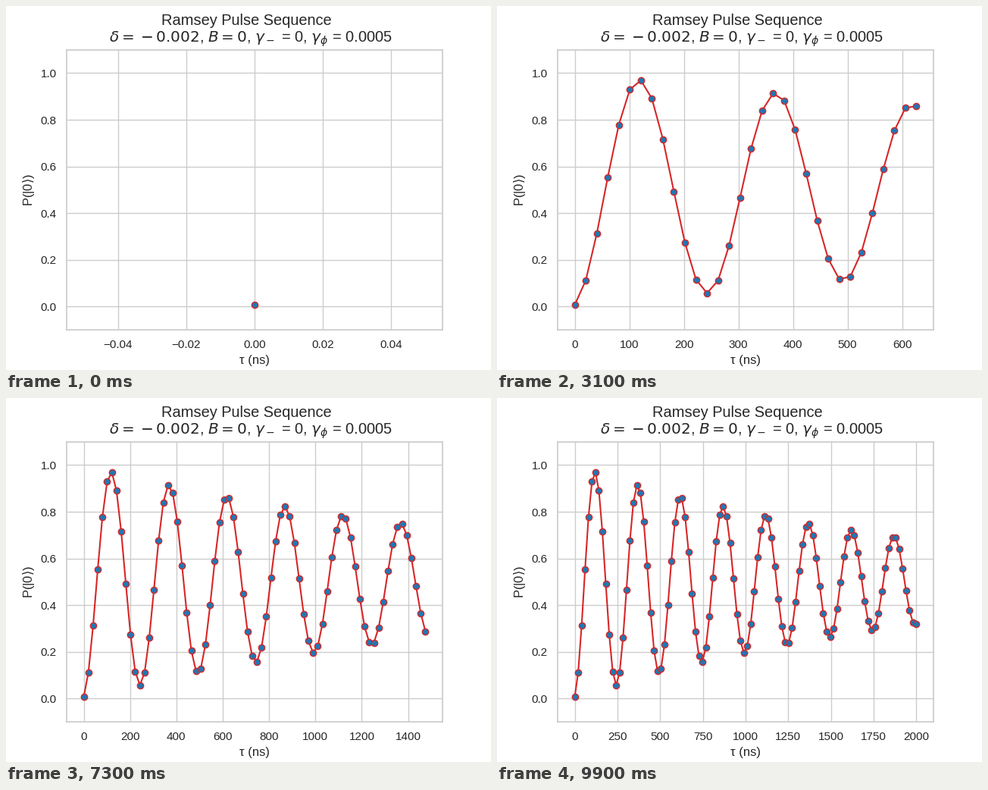
These frames come from a looping animation (640 by 480 pixels, 10 s). A matplotlib script:

```python
import matplotlib.pyplot as plt
import numpy as np
from matplotlib.animation import FuncAnimation

INK = "0.15"
RULE = "0.8"

plt.rcParams.update({
    "font.family": "sans-serif",
    "font.sans-serif": ["Liberation Sans", "DejaVu Sans"],
    "font.size": 12,
    "axes.labelsize": 12,
    "xtick.labelsize": 11,
    "ytick.labelsize": 11,
    "figure.titlesize": 14.4,
    "text.color": INK,
    "axes.labelcolor": INK,
    "xtick.color": INK,
    "ytick.color": INK,
    "axes.edgecolor": RULE,
    "axes.linewidth": 1.25,
    "axes.axisbelow": True,
    "axes.grid": True,
    "grid.color": RULE,
    "grid.linewidth": 1,
    "xtick.bottom": False,
    "ytick.left": False,
    "xtick.major.size": 6,
    "ytick.major.size": 6,
    "lines.solid_capstyle": "round",
})

STEPS = 100
DETUNING = 0.002   # cycles per ns, doubled by the level splitting
DEPHASING = 0.0005
PULSE = 5          # length of each pi/2 pulse in ns


def ramsey(t):
    """Ground state probability after two pulses separated by t."""
    phase = 4 * np.pi * DETUNING * (t + 4 * PULSE / np.pi)
    return 0.5 - 0.5 * np.exp(-DEPHASING * (t + PULSE / 2)) * np.cos(phase)


tau = np.linspace(0, 2000, STEPS)
prob = ramsey(tau)

fig, ax = plt.subplots(figsize=(6.4, 4.8), dpi=100)
minus = r"\hspace{0.2}{-}\hspace{0.2}"
fig.suptitle(
    "Ramsey Pulse Sequence \n"
    rf" $\delta = {minus}0.002$, $B=0$, $\gamma_{{{minus}}}$ = 0, "
    r"$\gamma_\phi$ = 0.0005"
)
ax.set_xlabel("τ (ns)")
ax.set_ylabel(r"P(|0$\rangle$)")
ax.set_ylim(-0.1, 1.1)

line, = ax.plot([], [], "o-", color="tab:red", lw=1.5, ms=6,
                markerfacecolor="tab:blue", markeredgewidth=1)


def update(i):
    line.set_data(tau[:i + 1], prob[:i + 1])
    ax.relim()
    ax.autoscale_view(scaley=False)
    return line,


anim = FuncAnimation(fig, update, frames=STEPS, init_func=lambda: update(0),
                     interval=100, repeat=True, repeat_delay=0)
plt.show()
```
